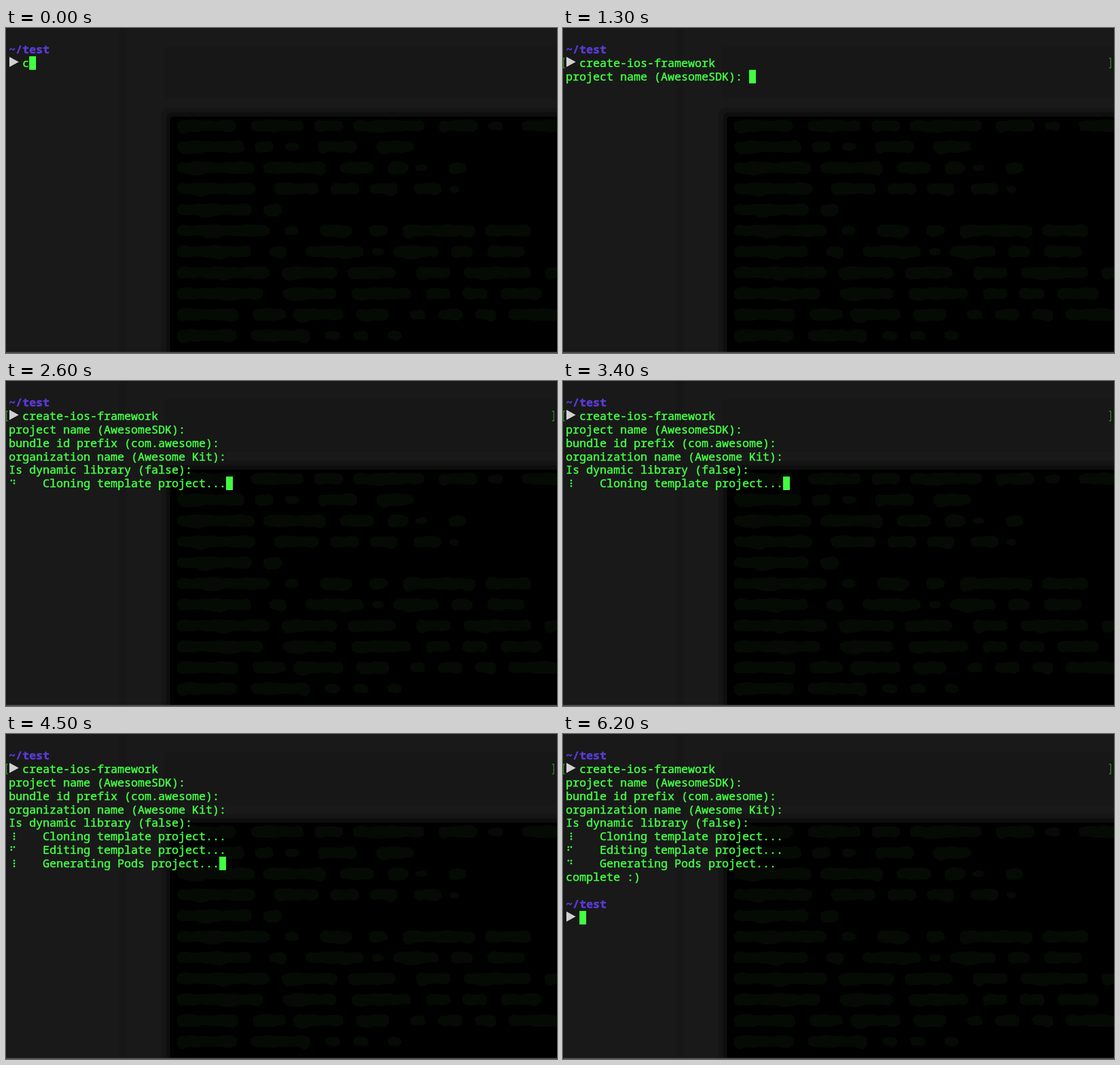
An HTML page with a canvas that plays this animation: 974 by 575 pixels, repeating every 6300 ms.

```html
<!DOCTYPE html>
<html lang="en">
<head>
<meta charset="utf-8">
<title>Terminal session</title>
<style>
html, body { margin: 0; width: 100%; height: 100%; overflow: hidden; background: #191919; }
canvas { display: block; }
</style>
</head>
<body>
<canvas id="stage" width="974" height="575"></canvas>
<script>
const canvas = document.getElementById('stage');
const ctx = canvas.getContext('2d');
const W = canvas.width, H = canvas.height;
const LOOP = 6300, STEP = 100;
const LEFT = 5, TOP = 26.2, CELL = 12, LINE = 23.95;
const GREEN = '#42fb43', PURPLE = '#583bd3';
const FONT = '20px "Noto Sans Mono", "DejaVu Sans Mono", monospace';

const COMMAND = 'create-ios-framework';
const PROMPTS = [
  { at: 1000, text: 'project name (AwesomeSDK): ' },
  { at: 1500, text: 'bundle id prefix (com.awesome): ' },
  { at: 1700, text: 'organization name (Awesome Kit): ' },
  { at: 2000, text: 'Is dynamic library (false): ' }
];
const TASKS = [
  { at: 2500, stop: 3400, text: 'Cloning template project...' },
  { at: 3500, stop: 3560, text: 'Editing template project...' },
  { at: 3600, stop: 5700, text: 'Generating Pods project...' }
];
const ENTER = 800, CLONE = 2400, DONE = 5900, EXIT = 6100;

function seeded(seed) {
  return () => (seed = seed * 16807 % 2147483647) / 2147483647;
}

// A blurred word: rounded ends, uneven edges, a few descenders.
function blob(g, x0, x1, y) {
  const half = Math.min(10, (x1 - x0) * 0.3);
  const edge = (x, side) => {
    const round = Math.sqrt(Math.min(1, (Math.min(x - x0, x1 - x) + 2) / 10));
    const wave = Math.sin(x * 0.09 + y) + 0.7 * Math.sin(x * 0.23 + side * 2 + y);
    const tail = side > 0 ? Math.max(0, Math.sin(x * 0.055 + y) - 0.6) * 8 : 0;
    return y + side * round * (half + half * 0.09 * wave + tail);
  };
  g.beginPath();
  for (let x = x0; x <= x1; x += 2) g.lineTo(x, edge(x, -1));
  for (let x = x1; x >= x0; x -= 2) g.lineTo(x, edge(x, 1));
  g.fill();
}

function makeBackdrop() {
  const layer = document.createElement('canvas');
  layer.width = W;
  layer.height = H;
  const g = layer.getContext('2d');
  const box = (color, x, y, w = W, h = H, r = 0) => {
    g.fillStyle = color;
    g.beginPath();
    g.roundRect(x, y, w, h, r);
    g.fill();
  };
  box('#191919', 0, 0);
  box('#171717', 200, 0, 13);
  box('#171717', 280, 32, W, 94, 8);
  box('#151515', 274, 141, W, H, 14);
  box('#0e0e0e', 283, 149, W, H, 10);
  box('#000', 290, 157, W, H, 5);

  g.fillStyle = '#050a05';
  const random = seeded(42);
  const rowEnds = [W, 721, 814, 801, 496, 928, 928, W, 947, W, 700];
  rowEnds.forEach((end, i) => {
    let x = 302;
    while (x < end - 12) {
      const width = x === 302 ? 105 + 60 * random() : 20 + 110 * random() ** 1.3;
      blob(g, x, end < W ? Math.min(end, x + width) : x + width, 173 + 37.1 * i);
      x += width + 12 + 26 * random();
    }
  });
  box('#484848', 0, 573, W, 2);
  return layer;
}

const backdrop = makeBackdrop();
const rowTop = row => Math.floor(TOP + row * LINE);

// A thin outline gives the glyphs the heavier stem of a terminal.
function print(row, col, text, color = GREEN, weight = 'normal') {
  const x = LEFT + col * CELL, y = rowTop(row) + 19;
  ctx.font = weight + ' ' + FONT;
  ctx.fillStyle = ctx.strokeStyle = color;
  ctx.lineWidth = 0.6;
  ctx.lineJoin = 'round';
  ctx.fillText(text, x, y);
  ctx.strokeText(text, x, y);
}

function cursor(row, col) {
  ctx.fillStyle = '#40ff40';
  ctx.fillRect(LEFT + col * CELL, rowTop(row), CELL, 24);
}

function prompt(row) {
  print(row, 0, '~/test', PURPLE, 'bold');
  const y = rowTop(row + 1);
  ctx.fillStyle = '#d0d0d0';
  ctx.beginPath();
  ctx.moveTo(6, y + 1);
  ctx.lineTo(22.5, y + 10);
  ctx.lineTo(6, y + 19);
  ctx.fill();
}

function bracket(x, dir) {
  ctx.strokeStyle = '#2f9a30';
  ctx.lineWidth = 1.3;
  ctx.beginPath();
  ctx.moveTo(x + dir * 3, 53.5);
  ctx.lineTo(x, 53.5);
  ctx.lineTo(x, 70.5);
  ctx.lineTo(x + dir * 3, 70.5);
  ctx.stroke();
}

// Braille cell: the low six bits give two columns of three dots.
function spinner(row, elapsed) {
  const tick = Math.floor(elapsed * 0.015);
  const bits = '⠋⠙⠹⠸⠼⠴⠦⠧⠇⠏'.charCodeAt(tick % 10) & 63;
  ctx.fillStyle = GREEN;
  for (let i = 0; i < 6; i++) {
    if (!(bits >> i & 1)) continue;
    ctx.beginPath();
    ctx.arc(i < 3 ? 9.5 : 14.5, rowTop(row) + 7 + 5 * (i % 3), 1.7, 0, 7);
    ctx.fill();
  }
}

// Typing comes in two bursts, the second one faster.
function typedCount(t) {
  const burst = t < 600
    ? 1 + 2 * Math.min(3, Math.max(0, t / STEP - 1))
    : 10 + 5 * (t - 600) / STEP;
  return Math.min(COMMAND.length, burst);
}

function draw(t) {
  ctx.drawImage(backdrop, 0, 0);
  prompt(0);
  const typed = COMMAND.slice(0, typedCount(t));
  let caret = [1, 2 + typed.length];
  print(1, 2, typed);
  if (t >= ENTER) {
    bracket(0.7, 1);
    bracket(968.3, -1);
  }

  PROMPTS.forEach(({ at, text }, i) => {
    if (t < at) return;
    print(2 + i, 0, text);
    caret = [2 + i, text.length];
  });
  if (t >= CLONE) caret = [6, 0];
  TASKS.forEach(({ at, stop, text }, i) => {
    if (t < at) return;
    print(6 + i, 5, text);
    spinner(6 + i, Math.min(t, stop) - at);
    caret = [6 + i, 5 + text.length];
  });
  if (t >= DONE) {
    print(9, 0, 'complete :)');
    caret = [10, 0];
  }
  if (t >= EXIT) {
    prompt(11);
    caret = [12, 2];
  }
  cursor(...caret);
}

function tick() {
  const t = performance.now() % LOOP;
  draw(Math.floor(t / STEP) * STEP);
  requestAnimationFrame(tick);
}
tick();
</script>
</body>
</html>
```
